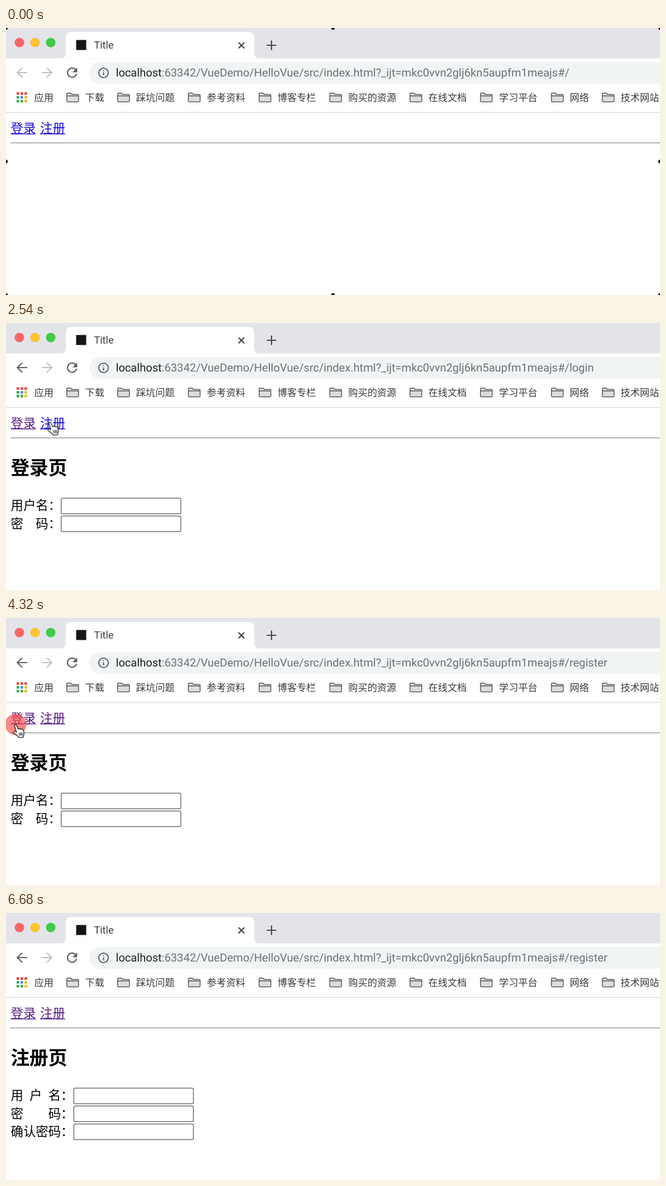
An HTML page that plays this animation: 1170 by 479 pixels, repeating every 8380 ms.

```html
<!DOCTYPE html>
<html lang="zh-CN">
<head>
<meta charset="utf-8">
<title>Title</title>
<style>
  html, body { margin: 0; width: 100%; height: 100%; overflow: hidden; background: #fff; }
  svg { position: absolute; left: 0; top: 0; display: block; }
  text { font-family: "Noto Sans CJK SC", "Noto Sans CJK", sans-serif; white-space: pre; }

  .title { font: 18px Roboto, sans-serif; fill: #3c4043; }
  .marks { font-size: 17.2px; fill: #35383c; }
  .page { font-size: 22.4px; }
  .page .head { font-size: 33.6px; font-weight: 700; }
  .box { fill: #fff; stroke: #6f6f6f; stroke-width: 1.5; }
  .line { fill: none; stroke: #5b5f64; stroke-width: 2.2; }
  .thin { stroke-width: 2; }
  .dark { stroke: #44474b; }
  .off { stroke: #bcbec0; }

  .url {
    position: absolute; left: 196.5px; top: 68px; white-space: nowrap;
    font: 20.1px/24px Roboto, sans-serif; color: #6c7074;
    text-rendering: geometricPrecision;
  }
  .url b { font-weight: 400; color: #202124; }
  .url i { position: absolute; font-style: normal; visibility: hidden; }

  /* Hard switches */
  .handles, .back, .link1, .link2, .login, .register, .to-login, .to-register, .arrow, .hand {
    animation: 8380ms step-end infinite;
  }
  .login, .register, .arrow, .hand { visibility: hidden; }
  .handles { animation-name: handles; }
  .back { animation-name: back; }
  .link1 { animation-name: visit1; }
  .link2 { animation-name: visit2; }
  .login { animation-name: login; }
  .register { animation-name: register; }
  .url .to-login { animation-name: to-login; }
  .url .to-register { animation-name: to-register; }
  .arrow { animation-name: arrow; }
  .hand { animation-name: hand; }

  @keyframes handles { 0% { visibility: visible } .955%, 100% { visibility: hidden } }
  @keyframes back { 0% { stroke: #bcbec0 } 21.241%, 100% { stroke: #5b5f64 } }
  @keyframes visit1 { 0% { fill: #1408e4 } 21.241%, 100% { fill: #551a8b } }
  @keyframes visit2 { 0% { fill: #1408e4 } 36.277%, 100% { fill: #551a8b } }
  @keyframes login {
    0%, 35.322%, 66.348%, 100% { visibility: hidden }
    20.823%, 51.313% { visibility: visible }
  }
  @keyframes register {
    0%, 51.313% { visibility: hidden }
    35.322%, 66.348%, 100% { visibility: visible }
  }
  @keyframes to-login {
    0%, 36.277%, 66.826%, 100% { visibility: hidden }
    21.241%, 51.79% { visibility: visible }
  }
  @keyframes to-register {
    0%, 51.79% { visibility: hidden }
    36.277%, 66.826%, 100% { visibility: visible }
  }
  @keyframes arrow {
    0%, 13.365%, 79.714%, 100% { visibility: hidden }
    4.296%, 69.81% { visibility: visible }
  }
  @keyframes hand {
    0%, 69.81%, 100% { visibility: hidden }
    13.365% { visibility: visible }
  }

  /* Pointer path */
  .pointer { animation: move 8380ms ease-in-out infinite; }
  @keyframes move {
    0%, 4.296% { transform: translate(242px, 458px); animation-timing-function: ease-out }
    5.967%, 8.4% { transform: translate(10px, 232px) }
    10.74%, 24.582% { transform: translate(33px, 182.5px) }
    31.026%, 39.857% { transform: translate(80.5px, 177.5px); animation-timing-function: cubic-bezier(.4, 0, .7, .8) }
    44.869% { transform: translate(25px, 185.5px); animation-timing-function: ease-out }
    46.539%, 54.415% { transform: translate(18px, 191px) }
    57.995%, 59.427% { transform: translate(75px, 178.5px) }
    60.859%, 69.451% { transform: translate(81.5px, 176px) }
    71.48% { transform: translate(811px, 34px) }
    73.508%, 75.179% { transform: translate(376px, 103px); animation-timing-function: ease-in }
    79.714%, 100% { transform: translate(1122px, -24px) }
  }

  /* Click marker: grows on press, shrinks on release */
  .click { fill: #fb4d49; fill-opacity: .66; transform: scale(0); animation: click 8380ms infinite; }
  @keyframes click {
    0%, 17.005%, 23.628%, 31.742%, 38.484%, 47.494%, 54.117%, 62.53%, 69.153%, 100% {
      transform: scale(0); animation-timing-function: cubic-bezier(.33, .67, .67, 1);
    }
    19.69%, 20.943%, 34.427%, 35.8%, 50.179%, 51.432%, 65.215%, 66.468% {
      transform: scale(1); animation-timing-function: cubic-bezier(.33, 0, .67, .33);
    }
  }
</style>
</head>
<body>
<svg width="1170" height="479" viewBox="0 0 1170 479">
  <defs>
    <g id="folder" stroke="#55585c" stroke-width="1.5" stroke-linejoin="round">
      <path fill="#dcdcdc" d="M.8 15V2.2q0-1.4 1.4-1.4h5.6l2.2 2.4h10.4q1.4 0 1.4 1.4V15q0 1.4-1.4 1.4H2.2Q.8 16.4.8 15z"/>
      <path fill="none" d="M1 5.8h20.6"/>
    </g>
    <rect id="field" class="box" width="214" height="28" rx="2.5"/>
    <rect id="dot" width="4.6" height="4.6"/>
    <path id="underline" d="M0 189.2h44.8v1.6H0z"/>
  </defs>

  <!-- Tab strip -->
  <path fill="#e3e4ea" d="M0 0h1170v54.5H0z"/>
  <path fill="#fff" d="M97 54.5q10 0 10-10V17q0-10 10-10h317q10 0 10 10v27.5q0 10 10 10z"/>
  <circle cx="24" cy="26" r="8.6" fill="#fc6566"/>
  <circle cx="52" cy="26" r="8.6" fill="#fdc332"/>
  <circle cx="80" cy="26" r="8.6" fill="#40cb48"/>
  <rect x="125.5" y="21.5" width="18" height="18" fill="#17151a"/>
  <text class="title" x="157.5" y="37">Title</text>
  <path class="line dark" d="M416 26l10.4 10.4m0-10.4L416 36.4"/>
  <path class="line dark" stroke-width="2.6" d="M466.5 31h17m-8.5-8.5v17"/>

  <!-- Toolbar -->
  <path class="line back" d="M38 80H20.5m8.500-8.500L20.300 80l8.700 8.500"/>
  <path class="line off" d="M64 80h17.5m-8.5-8.5l8.7 8.5-8.7 8.5"/>
  <path class="line" d="M125 75.5A8.2 8.2 0 1 0 126.2 82"/>
  <path fill="#5b5f64" d="M127.3 71v8.4h-8.4z"/>
  <path fill="#f1f4f4" d="M1170 61H168.5a19.500 19.500 0 0 0 0 39H1170z"/>
  <circle class="line thin" cx="174.5" cy="80.5" r="8.5"/>
  <path class="line thin" d="M174.5 79.5v5.5m0-9.5v2"/>

  <!-- Bookmarks -->
  <g transform="translate(19 115.3)">
    <g fill="#e8453c"><use href="#dot"/><use href="#dot" x="7"/><use href="#dot" x="14"/></g>
    <g fill="#35a853"><use href="#dot" y="6.8"/><use href="#dot" y="13.6"/><use href="#dot" x="7" y="13.6"/></g>
    <use href="#dot" x="7" y="6.8" fill="#4285f4"/>
    <g fill="#f6b60b"><use href="#dot" x="14" y="6.8"/><use href="#dot" x="14" y="13.6"/></g>
  </g>
  <use href="#folder" x="108" y="116"/>
  <use href="#folder" x="199" y="116"/>
  <use href="#folder" x="325.5" y="116"/>
  <use href="#folder" x="452" y="116"/>
  <use href="#folder" x="578.5" y="116"/>
  <use href="#folder" x="722" y="116"/>
  <use href="#folder" x="848" y="116"/>
  <use href="#folder" x="975" y="116"/>
  <use href="#folder" x="1066" y="116"/>
  <g class="marks">
    <text x="50.5" y="131">应用</text>
    <text x="141.5" y="131">下载</text>
    <text x="232.8" y="131">踩坑问题</text>
    <text x="359.3" y="131">参考资料</text>
    <text x="485.8" y="131">博客专栏</text>
    <text x="612.3" y="131">购买的资源</text>
    <text x="755.5" y="131">在线文档</text>
    <text x="882" y="131">学习平台</text>
    <text x="1008.5" y="131">网络</text>
    <text x="1099.5" y="131">技术网站</text>
  </g>
  <path fill="#dcdddf" d="M0 150.8h1170v1.4H0z"/>

  <!-- Page -->
  <g class="page">
    <g class="link1"><text x="8.5" y="187.8">登录</text><use href="#underline" x="8.5"/></g>
    <g class="link2"><text x="61" y="187.8">注册</text><use href="#underline" x="61"/></g>
    <path fill="#999" d="M8 205.3h1162v1.4H8z"/>
    <path fill="#dedede" d="M8 206.7h1162v.9H8z"/>

    <g class="login">
      <text class="head" x="8.5" y="272">登录页</text>
      <text x="8.5" y="335.2">用户名：</text>
      <text x="8.5" y="367.5">密　码：</text>
      <use href="#field" x="98.7" y="314.2"/>
      <use href="#field" x="98.7" y="346.3"/>
    </g>
    <g class="register">
      <text class="head" x="8.5" y="272">注册页</text>
      <text x="8.5 42.1 75.7 98.1" y="335.2">用户名：</text>
      <text x="8.5 75.7 98.1" y="367.5">密码：</text>
      <text x="8.5" y="399.7">确认密码：</text>
      <use href="#field" x="121.3" y="314.2"/>
      <use href="#field" x="121.3" y="346.3"/>
      <use href="#field" x="121.3" y="378.5"/>
    </g>
  </g>

  <!-- Selection handles -->
  <path class="handles" stroke="#1c1c1c" stroke-width="6.4" stroke-linecap="round"
    d="M0 0h0M585 0h0M1170 0h0M0 239.5h0M1170 239.5h0M0 479h0M585 479h0M1170 479h0"/>

  <g class="pointer">
    <circle class="click" cx="-.6" r="19.3"/>
    <path class="arrow" stroke="#fff" stroke-width="1.5" stroke-linejoin="round"
      d="M0 0v18.5l4.3-4 3.3 7.7 3.3-1.4-3.3-7.6h6z"/>
    <g class="hand" stroke="#111" stroke-width="1.2" stroke-linejoin="round" stroke-linecap="round"
      style="filter:drop-shadow(0 1px 1px #0004)">
      <path fill="#fff" d="M-2.5 2.5c-.6-2 2.2-3.2 3.2-1.2l3.2 7.2c.3-1.6 2.6-1.6 3.1 0 .5-1.3 2.5-1.2 3 .4.8-1 2.6-.6 3 1.2 1 3 1.4 5.2.8 7.6l-1 5.3H4.4c-1.6-3-4.3-5-7.6-7.2-1.8-1.2-1.5-3.4.6-3.3 1.2 0 2.4.8 3.4 1.6z"/>
      <path fill="none" d="M5.5 15l.8 5M8.2 14.6l.7 5M10.8 14.6l.4 4.8"/>
    </g>
  </g>
</svg>
<div class="url"><b>localhost</b>:63342/VueDemo/HelloVue/src/index.html?_ijt=mkc0vvn2glj6kn5aupfm1meajs#/<i class="to-login">login</i><i class="to-register">register</i></div>
</body>
</html>
```
